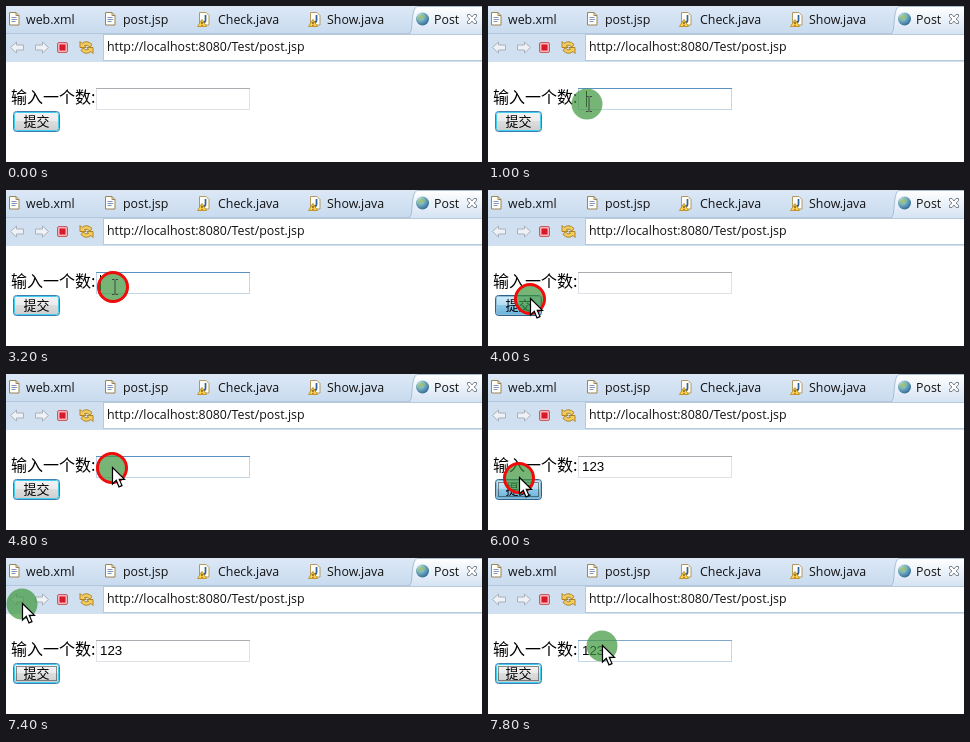
Animation of 476 by 156 pixels, one loop 8000 ms. Source, as an HTML page:

```html
<!DOCTYPE html>
<html lang="zh">
<head>
<meta charset="utf-8">
<title>Post</title>
<style>
html, body { margin: 0; width: 100%; height: 100%; overflow: hidden; background: #fff; }
svg { display: block; width: 476px; height: 156px; }
text { white-space: pre; }
.ui { font: 12.4px "Open Sans", "Noto Sans", sans-serif; fill: #111; }
.cjk { font-family: "Noto Sans CJK SC", "Noto Sans CJK", sans-serif; fill: #000; }
.latin { font: bold 32px "Liberation Serif", serif; }
.field { font: 13.33px "Liberation Sans", sans-serif; }
</style>
</head>
<body>
<svg viewBox="0 0 476 156" xmlns="http://www.w3.org/2000/svg">
  <defs>
    <linearGradient id="bar" x2="0" y2="1"><stop stop-color="#dce8f6"/><stop offset="1" stop-color="#c9dbef"/></linearGradient>
    <linearGradient id="tab" x2="0" y2="1"><stop stop-color="#fff"/><stop offset="1" stop-color="#d5e3f3"/></linearGradient>
    <linearGradient id="normal" x2="0" y2="1"><stop stop-color="#f3f3f3"/><stop offset=".5" stop-color="#ebebeb"/><stop offset=".5" stop-color="#dddddd"/><stop offset="1" stop-color="#cdcdcd"/></linearGradient>
    <linearGradient id="hover" x2="0" y2="1"><stop stop-color="#eaf6fd"/><stop offset=".5" stop-color="#d9f0fc"/><stop offset=".5" stop-color="#bee6fd"/><stop offset="1" stop-color="#a7d9f5"/></linearGradient>
    <linearGradient id="press" x2="0" y2="1"><stop stop-color="#d5ecf8"/><stop offset=".5" stop-color="#b0dcf2"/><stop offset=".5" stop-color="#8cc8e8"/><stop offset="1" stop-color="#68b3db"/></linearGradient>
    <radialGradient id="ball" cx=".35" cy=".3" r=".8"><stop stop-color="#d8f0f4"/><stop offset=".45" stop-color="#6fabc4"/><stop offset="1" stop-color="#28628c"/></radialGradient>
    <g id="doc">
      <path d="M.5.5h6.5l3 3v9.500h-9.500z" fill="#fffdf4" stroke="#9a8558"/>
      <path d="M7 .5v3h3" fill="none" stroke="#9a8558"/>
      <path d="M2.500 5.500h5M2.500 7.500h5.500M2.500 9.500h4" stroke="#7b95c4"/>
    </g>
    <g id="java">
      <path d="M.5.5h6.500l3 3v9.500h-9.500z" fill="#fffdf4" stroke="#b39a63"/>
      <path d="M6.500 3v5.200q0 2-2 2t-2-1.600" fill="none" stroke="#31609f" stroke-width="1.700"/>
      <path d="M4 7.500l4.500 7h-9z" transform="translate(-1)" fill="#ffd34d" stroke="#b88618" stroke-width=".8"/>
      <path d="M3 9.800v2.200m0 .8v1" stroke="#3b2b00"/>
    </g>
    <path id="arrow" d="M.5 5.500l6-5.500v3h7v5h-7v3z"/>
  </defs>

  <rect width="476" height="156" fill="#fff"/>
  <rect width="476" height="27" fill="url(#bar)"/>
  <rect y="27" width="476" height="29" fill="#d1e0f1"/>
  <path d="M0 27.500H404" stroke="#b4c6db"/>
  <path d="M403 28C408 27 404 .5 412 .5H476V28z" fill="url(#tab)"/>
  <path d="M403 27.500C408 27 404 .5 412 .5H476" fill="none" stroke="#a9bdd5"/>
  <rect x="97.500" y="28.500" width="380" height="26" fill="#fff" stroke="#b9c9dc"/>

  <g class="ui">
    <use href="#doc" x="3" y="6"/><text x="20" y="18">web.xml</text>
    <use href="#doc" x="99" y="6"/><text x="117" y="18">post.jsp</text>
    <use href="#java" x="193" y="6"/><text x="212" y="18">Check.java</text>
    <use href="#java" x="304" y="6"/><text x="321" y="18">Show.java</text>
    <circle cx="416.500" cy="13" r="6.500" fill="url(#ball)"/>
    <path d="M412 11q3-4 6-2t-2 4-1 4q-3-1-3-6z" fill="#8fb86a" opacity=".75"/>
    <text id="title" x="428" y="18"></text>
    <path id="close" d="M461.500 8.500h2.500l2 2.500 2-2.500h2.500v2.300l-2.500 2.200 2.500 2.200v2.300h-2.500l-2-2.500-2 2.500h-2.500v-2.300l2.500-2.200-2.500-2.200z" fill="#fff" stroke="#6f7882" stroke-width=".9"/>
    <text id="url" x="101" y="45"></text>
  </g>
  <use id="back" href="#arrow" x="4" y="36"/>
  <use href="#arrow" transform="translate(43 36) scale(-1 1)" fill="#eef2f7" stroke="#a9b0b9"/>
  <rect x="51.500" y="36.500" width="10" height="10" rx="1.500" fill="#f2b6b6" stroke="#c85a60"/>
  <rect x="53.500" y="38.500" width="6" height="6" fill="#d9182d"/>
  <g fill="#f5cd5c" stroke="#a87c1e" stroke-width=".9">
    <path id="turn" d="M74 41.500v-6l2 2q5-4 10 1l-2 2.500q-3-3-5.500-1.500l1.500 2z"/>
    <use href="#turn" transform="rotate(180 80.500 41.500)"/>
  </g>

  <g id="form">
    <text class="cjk" x="5" y="97" font-size="16">输入一个数:</text>
    <rect id="box" x="90.500" y="82.500" width="153" height="21" fill="#fff"/>
    <path id="edge" d="M90 82.500H244"/>
    <text id="value" class="field" x="94" y="97"></text>
    <path id="caret" d="M.5 85v16" stroke="#000"/>
    <rect id="btn" x="7.500" y="105.500" width="46" height="20" rx="3"/>
    <rect id="glow" x="8.500" y="106.500" width="44" height="18" rx="2" fill="none"/>
    <rect id="dots" x="10.500" y="108.500" width="40" height="14" fill="none" stroke="#222" stroke-dasharray="1 1"/>
    <text class="cjk" x="17.500" y="119.500" font-size="13">提交</text>
  </g>
  <g id="result">
    <text class="cjk" x="9" y="101" font-size="32.500" font-weight="500">收到参数</text>
    <text class="latin" x="140" y="101">:123.0</text>
  </g>

  <g id="mouse">
    <circle id="halo" r="15.500" fill="#3c963c" fill-opacity=".7"/>
    <circle id="ring" r="14.500" fill="none" stroke="#f00c0c" stroke-width="3"/>
    <path id="point" d="M.5-.5v16.500l3.800-3.600 2.700 6.500 3-1.300-2.700-6.200h5.200z" fill="#fff" stroke="#000" stroke-width="1.200"/>
    <path id="beam" d="M-1-7.500h2.500m1 0H5M2-7V7M-1 7.500h2.500m1 0H5" fill="none" stroke="#444"/>
  </g>
</svg>
<script>
const LOOP = 8000, STEP = 200, SPACE = 3.7, DIGIT = 7.41;
const $ = id => document.getElementById(id);
const set = (id, attrs) => { for (const k in attrs) $(id).setAttribute(k, attrs[k]); };
const show = (id, on) => set(id, { display: on ? 'inline' : 'none' });

// time, x, y
const path = [
  [200, 153, 140], [600, 112, 101], [800, 107, 98], [1200, 90, 98], [1400, 88, 99],
  [2000, 46, 111], [2400, 44, 112], [3000, 106, 97], [3200, 107, 97], [3600, 104, 97],
  [4000, 42, 109], [4200, 42, 109], [4600, 104, 95], [4800, 106, 94], [5400, 104, 94],
  [5800, 34, 105], [6000, 31, 104], [6200, 32, 111], [6600, 32, 111], [6800, 34, 86],
  [7200, 12, 42], [7400, 16, 46], [7800, 114, 88]
];
const clicks = [800, 2200, 3200, 4000, 4800, 6000, 7200];
const focus = [[800, 2200], [3200, 4000], [4800, 6000]];

function place(t) {
  const i = path.findIndex(p => p[0] >= t);
  if (i <= 0) return path[0].slice(1);
  const [t0, x0, y0] = path[i - 1], [t1, x1, y1] = path[i];
  const u = (t - t0) / (t1 - t0), e = u * u * (3 - 2 * u);
  return [x0 + (x1 - x0) * e, y0 + (y1 - y0) * e];
}

function typed(t) {
  if (t >= 7400) return '123';
  if (t >= 5000) return '123'.slice(0, (t - 4800) / STEP);
  if (t >= 1000 && t <= 2200) return ' '.repeat(Math.min(5, (t - 800) / STEP));
  return '';
}

function draw(now) {
  const t = Math.floor(now % LOOP / STEP) * STEP;
  const done = t >= 6200 && t < 7400;
  const [x, y] = place(t), click = clicks.includes(t);
  const overBtn = x > 7 && x < 54 && y > 103 && y < 126;
  const overBox = x > 90 && x < 244 && y > 82 && y < 104;
  const active = focus.some(([a, b]) => t >= a && t < b);
  const text = typed(t);

  show('form', !done);
  show('result', done);
  $('title').textContent = done ? 'http://localhost' : 'Post';
  show('close', !done);
  $('url').textContent = 'http://localhost:8080/Test/' + (done ? 'check' : 'post.jsp');
  set('back', { fill: done ? '#fbe08a' : '#eef2f7', stroke: done ? '#b08a2a' : '#a9b0b9' });

  const lit = active || overBox;
  set('box', { stroke: lit ? '#c3d7e9' : '#e0e2e8' });
  set('edge', { stroke: active ? '#5a91c0' : lit ? '#7fa8cc' : '#abadb3' });
  $('value').textContent = text;
  show('caret', active && t % 1000 < 600);
  const wide = text.trim() ? DIGIT : SPACE;
  set('caret', { transform: `translate(${Math.round(94 + text.length * wide)})` });

  const mode = overBtn ? click ? 'press' : 'hover' : 'normal';
  set('btn', { fill: `url(#${mode})`, stroke: mode == 'press' ? '#2c628b' : '#3c7fb1' });
  set('glow', { stroke: { press: '#8fbdd6', hover: '#f2fafe', normal: '#3fcdf0' }[mode] });
  show('dots', t >= 6000);

  show('mouse', t >= 200);
  set('mouse', { transform: `translate(${Math.round(x)} ${Math.round(y)})` });
  show('ring', click);
  const beam = overBox && t < 3800;
  show('beam', beam);
  show('point', !beam);
}

function tick() {
  draw(performance.now());
  requestAnimationFrame(tick);
}
tick();
</script>
</body>
</html>
```
